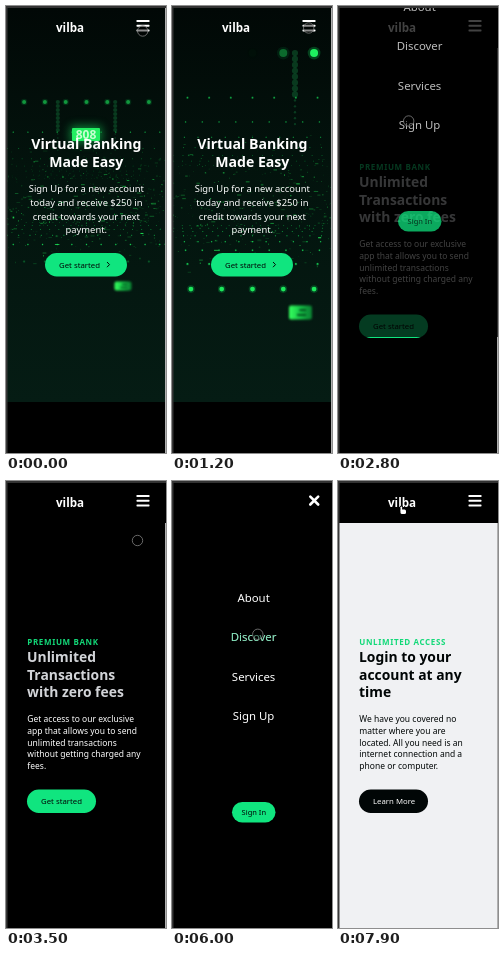
An HTML page with a canvas that plays this animation: 160 px wide and 447 px high, repeating every 8 s.

```html
<!DOCTYPE html>
<html lang="en">
<head>
<meta charset="utf-8">
<title>Banking site demo</title>
<style>
  html, body { margin: 0; width: 100%; height: 100%; overflow: hidden; background: #000; }
  canvas { display: block; width: 160px; height: 447px; }
</style>
</head>
<body>
<canvas id="stage"></canvas>
<script>
const W = 160, H = 447, LOOP = 8000, STEP = 100;
const GREEN = '#10e57f', INK = '#010606', EDGE = '#b0b0b0';
const canvas = document.getElementById('stage');
const ctx = canvas.getContext('2d');
const ratio = window.devicePixelRatio || 1;
canvas.width = W * ratio;
canvas.height = H * ratio;

const clamp = v => Math.max(0, Math.min(1, v));
const lerp = (a, b, p) => a + (b - a) * p;
const ease = p => p * p * (3 - 2 * p);
const span = (t, from, to) => clamp((t - from) / (to - from));

function random(seed) {
  return () => {
    seed = (seed * 16807) % 2147483647;
    return seed / 2147483647;
  };
}

function rect(x, y, w, h, color, radius = 0) {
  ctx.fillStyle = color;
  ctx.beginPath();
  ctx.roundRect(x, y, w, h, radius);
  ctx.fill();
}

function disc(x, y, r, color) {
  ctx.fillStyle = color;
  ctx.beginPath();
  ctx.arc(x, y, r, 0, 7);
  ctx.fill();
}

function line(points, width, color) {
  ctx.strokeStyle = color;
  ctx.lineWidth = width;
  ctx.beginPath();
  points.forEach(([x, y]) => ctx.lineTo(x, y));
  ctx.stroke();
}

function text(str, x, y, size, color, { bold, align = 'left', spacing = 0 } = {}) {
  ctx.font = `${bold ? 700 : 400} ${size}px "Noto Sans", "Open Sans", sans-serif`;
  ctx.textAlign = align;
  ctx.letterSpacing = spacing + 'px';
  ctx.fillStyle = color;
  ctx.fillText(str, x, y);
}

function lines(list, x, y, pitch, size, color, options) {
  list.forEach((str, i) => text(str, x, y + i * pitch, size, color, options));
}

// Background clip: a flight through a corridor of glowing dots
const VANISH = { x: 80.5, y: 198 };
const CEILING = 102, FLOOR = 57.5, GAP = 20.8;
const rand = random(77);
const specks = Array.from({ length: 420 }, () => ({
  x: (rand() - .5) * 165,
  y: (rand() + rand() - 1) * 62,
  w: .6 + rand() ** 4 * 4,
  h: .6 + rand() ** 3 * 1.2,
  alpha: .2 + rand() ** 2 * .8,
  phase: rand() * 6
}));

function glowDot(x, y, r, alpha) {
  disc(x, y, r * 1.6, `rgba(12,190,80,${alpha * .3})`);
  disc(x, y, r, `rgba(30,240,95,${alpha})`);
}

function drawBackdrop() {
  const back = ctx.createLinearGradient(0, 2, 0, 396);
  back.addColorStop(0, '#010806');
  back.addColorStop(.4, '#03130d');
  back.addColorStop(1, '#051c14');
  rect(1, 2, 158, 394, back);
}

function drawSpecks(t, zoom) {
  for (const s of specks) {
    const alpha = s.alpha * (.75 + .25 * Math.sin(s.phase + t / 180));
    rect(VANISH.x + s.x * Math.sqrt(zoom), VANISH.y + s.y * zoom ** .35,
      s.w, s.h, `rgba(32,228,84,${alpha})`);
  }
}

function drawRows(zoom, near) {
  for (let row = 7; row >= 0; row--) {
    const scale = zoom / (1 + row * .42);
    for (let k = -9; k <= 9; k++) {
      const x = VANISH.x + k * GAP * scale;
      const front = row === 0;
      const top = front ? lerp(.55, Math.exp(-((k - 2) ** 2)), near) : .6;
      const bottom = front ? lerp(.25, .95, near) : .75;
      glowDot(x, VANISH.y - CEILING * scale, front ? lerp(2, 4, near) : .8 * scale, top);
      glowDot(x, VANISH.y + FLOOR * scale, front ? lerp(1, 2.4, near) : .9 * scale, bottom);
    }
  }
}

// Chains of pale beads hanging from the ceiling on both sides
function drawChains(zoom, near) {
  for (const side of [-1, 1]) {
    const alpha = side < 0 ? .4 * (1 - near) : .4;
    for (let i = 0; i < 13; i++) {
      const y = VANISH.y - (CEILING - i * 4) * zoom;
      disc(VANISH.x + side * 28.7 * zoom, y, (i < 8 ? 2.1 : .8) * zoom, `rgba(20,125,62,${alpha})`);
    }
  }
}

function drawBlock(p) {
  const w = lerp(17, 23, p), h = lerp(9, 14, p);
  ctx.save();
  ctx.translate(lerp(108.5, 117, p), lerp(275.5, 299.5, p));
  ctx.filter = 'blur(.8px)';
  const glow = ctx.createLinearGradient(0, 0, w, 0);
  glow.addColorStop(0, '#36ff5e');
  glow.addColorStop(.5, '#16c448');
  glow.addColorStop(1, '#0a7a30');
  rect(0, 0, w, h, glow, 2);
  rect(w * .45, h * .25, w * .3, h * .15, '#04521f');
  rect(w * .35, h * .6, w * .4, h * .15, '#04521f');
  ctx.restore();
}

function drawSign(t, zoom) {
  ctx.save();
  ctx.globalAlpha = 1 - span(t, 200, 800);
  ctx.translate(80, 128.5);
  ctx.scale(zoom, zoom);
  ctx.filter = 'blur(4px)';
  rect(-16, -9, 32, 18, 'rgba(16,190,80,.6)', 4);
  ctx.filter = 'blur(.7px)';
  rect(-14, -6.5, 28, 13, '#22ee62', 1);
  text('808', 0, 4.5, 12, '#c8ffd2', { bold: true, align: 'center' });
  ctx.restore();
}

function drawClip(t) {
  const p = t / 1200, near = clamp(p), zoom = 1.48 ** p;
  drawBackdrop();
  drawSpecks(t, zoom);
  drawChains(zoom, near);
  drawRows(zoom, near);
  drawBlock(p);
  drawSign(t, zoom);
}

function drawHero(t) {
  const center = { align: 'center' };
  ctx.save();
  ctx.beginPath();
  ctx.rect(1, 2, 158, 394);
  ctx.clip();
  drawClip(t);
  ctx.restore();
  rect(159, 2, 1, 445, EDGE);
  lines(['Virtual Banking', 'Made Easy'], 80.3, 143, 17.6, 14.1, '#fff', { bold: true, ...center });
  lines(['Sign Up for a new account', 'today and receive $250 in', 'credit towards your next', 'payment.'],
    80.3, 186, 13.8, 9.4, '#fff', center);
  rect(39, 247, 82, 23.5, GREEN, 12);
  text('Get started', 53, 261.6, 7.8, INK);
  line([[101, 256], [103.5, 258.6], [101, 261.2]], 1, INK);
}

const sections = {
  premium: {
    back: '#000', title: '#d2d4d8', body: '#fff', fill: GREEN, label: INK,
    tag: 'PREMIUM BANK', button: 'Get started',
    heading: ['Unlimited', 'Transactions', 'with zero fees'],
    copy: ['Get access to our exclusive', 'app that allows you to send', 'unlimited transactions',
      'without getting charged any', 'fees.']
  },
  access: {
    back: '#f0f1f3', title: INK, body: INK, fill: INK, label: '#fff',
    tag: 'UNLIMITED ACCESS', button: 'Learn More',
    heading: ['Login to your', 'account at any', 'time'],
    copy: ['We have you covered no', 'matter where you are', 'located. All you need is an',
      'internet connection and a', 'phone or computer.']
  }
};

function drawSection(s) {
  rect(1, 2, 159, 445, s.back);
  rect(1, 2, 159, 40, '#000');
  rect(159, 42, 1, 405, EDGE);
  text(s.tag, 21.3, 164, 8, '#12d978', { bold: true, spacing: .63 });
  lines(s.heading, 21, 181, 17.6, 13.9, s.title, { bold: true });
  lines(s.copy, 21.3, 241, 11.8, 8.5, s.body);
  rect(21, 308.5, 69, 23.5, s.fill, 12);
  text(s.button, 35, 323, 7.8, s.label);
}

function drawHeader() {
  text('vilba', 50, 26, 11.6, '#fff', { bold: true });
  for (let i = 0; i < 3; i++) rect(130.5, 14 + i * 4.7, 13, 2, '#fff', .6);
}

function menuOpen(t) {
  if (t < 2700) return ease(span(t, 1200, 1600));
  if (t < 4700) return 1 - ease(span(t, 2700, 3000));
  return t < 6500 ? ease(span(t, 4700, 4900)) : 0;
}

function drawMenu(t) {
  const open = menuOpen(t);
  if (open === 0) return;
  ctx.save();
  ctx.globalAlpha = open;
  ctx.translate(0, (open - 1) * H);
  rect(1, 2, 159, 445, '#000');
  lines(['About', 'Discover', 'Services', 'Sign Up'], 81.6, 120.5, 39.5, 11.4, '#fff', { align: 'center' });
  ctx.globalAlpha = open * span(t, 5900, 6100);
  text('Discover', 81.6, 160, 11.4, '#01c873', { align: 'center' });
  ctx.globalAlpha = open;
  rect(60, 321, 43.5, 20.5, GREEN, 10.25);
  text('Sign In', 81.8, 334.2, 7.5, INK, { align: 'center' });
  const tapped = t < 1800 || (t >= 4700 && t < 5200);
  if (tapped) rect(129, 12, 15.5, 15.5, '#0b5052');
  ctx.lineCap = 'round';
  line([[138.3, 15.6], [146.2, 23.5]], 2.6, '#fff');
  line([[146.2, 15.6], [138.3, 23.5]], 2.6, '#fff');
  ctx.restore();
}

// Each glide ends where the pointer then rests
const glides = [
  { from: 0, to: 300, x: 136.7, y: 22 },
  { from: 1900, to: 2600, x: 78, y: 112 },
  { from: 2700, to: 3000, x: 56, y: 121 },
  { from: 3200, to: 3500, x: 131.5, y: 59.5 },
  { from: 3500, to: 3900, x: 141.5, y: 26 },
  { from: 4800, to: 4900, x: 118.5, y: 96 },
  { from: 4900, to: 5200, x: 85.8, y: 153.3 },
  { from: 6500, to: 7200, x: 65, y: 29.5 }
];

function pointerAt(t) {
  let x = 136.7, y = 25;
  for (const g of glides) {
    const p = span(t, g.from, g.to);
    x = lerp(x, g.x, p);
    y = lerp(y, g.y, p);
  }
  return { x, y };
}

function drawHand(x, y) {
  for (const [grow, color] of [[.7, '#000'], [0, '#fff']]) {
    rect(x - 2.5 - grow, y - 4 - grow, 1.6 + 2 * grow, 5 + 2 * grow, color, 1);
    rect(x - 2.5 - grow, y - 1 - grow, 5.5 + 2 * grow, 4.5 + 2 * grow, color, 1.5);
  }
}

function drawPointer(t) {
  const { x, y } = pointerAt(t);
  if (t >= 7400) return drawHand(x, y);
  disc(x, y, 5.2, 'rgba(0,0,0,.45)');
  ctx.strokeStyle = 'rgba(128,128,128,.8)';
  ctx.lineWidth = 1;
  ctx.beginPath();
  ctx.arc(x, y, 5.2, 0, 7);
  ctx.stroke();
}

function draw(t) {
  ctx.setTransform(ratio, 0, 0, ratio, 0, 0);
  rect(0, 0, W, H, '#000');
  if (t < 2700) drawHero(t);
  else drawSection(t < 6500 ? sections.premium : sections.access);
  drawHeader();
  drawMenu(t);
  const thumb = t < 6500 ? 0 : 1 - span(t, 6500, 6900);
  rect(158, 139, 2, 65, `rgba(120,120,120,${thumb})`, 1);
  drawPointer(t);
  rect(0, 0, W, 2, '#333');
  rect(0, 0, 1.5, H, '#383838');
}

function tick(now) {
  draw(Math.floor(now % LOOP / STEP) * STEP);
  requestAnimationFrame(tick);
}
requestAnimationFrame(tick);
</script>
</body>
</html>
```
